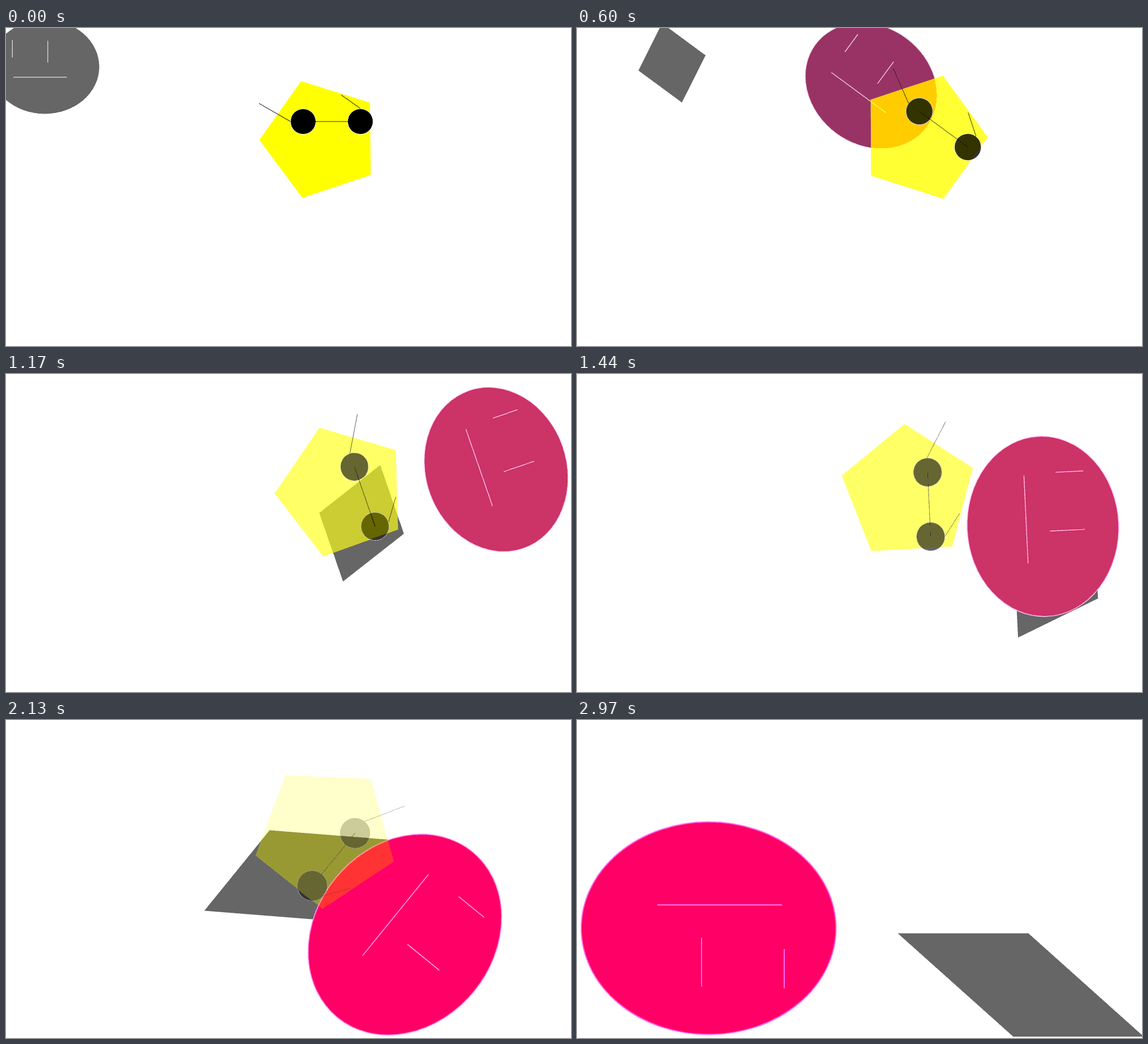
Animation of 998 by 561 pixels, one loop 3000 ms. Source, as an HTML page with a canvas:

```html
<!DOCTYPE html>
<html lang="en">
<head>
<meta charset="utf-8">
<title>Turning shapes</title>
<style>
  html, body { margin: 0; width: 998px; height: 561px; overflow: hidden; background: #fff; }
  canvas { display: block; filter: url(#web); }
  svg { position: absolute; width: 0; height: 0; }
</style>
</head>
<body>
<canvas id="stage" width="998" height="561"></canvas>
<svg aria-hidden="true">
  <!-- lifts the dark tones a little, then snaps every channel to six levels -->
  <filter id="web" x="0" y="0" width="1" height="1" color-interpolation-filters="sRGB">
    <feComponentTransfer>
      <feFuncR type="linear" slope=".98" intercept=".016"/>
      <feFuncG type="linear" slope=".98" intercept=".016"/>
      <feFuncB type="linear" slope=".98" intercept=".016"/>
    </feComponentTransfer>
    <feComponentTransfer>
      <feFuncR type="discrete" tableValues="0 .2 .2 .4 .4 .6 .6 .8 .8 1"/>
      <feFuncG type="discrete" tableValues="0 .2 .2 .4 .4 .6 .6 .8 .8 1"/>
      <feFuncB type="discrete" tableValues="0 .2 .2 .4 .4 .6 .6 .8 .8 1"/>
    </feComponentTransfer>
  </filter>
</svg>
<script>
const ctx = document.getElementById('stage').getContext('2d');
const STEP = 30, STEPS = 100, LAST = STEPS - 1, RAD = Math.PI / 180, TURN = 2 * Math.PI;

// Turning points of the two straight-legged paths: [step, x, y]
const discPath = [
  [0, 68.5, 68.5], [12, 339.5, 85.3], [36, 880, 135], [48, 823, 268.8],
  [60, 795, 365.8], [82, 614.1, 391.4], [99, 232.5, 367.3]
];
const slabPath = [
  [0, 68, 68], [7, 271, 232], [18, 119.3, 40.3], [50, 894.7, 380.1],
  [60, 815.6, 140], [82, 209.6, 407.4], [99, 784, 467.5]
];

const mix = (a, b, p) => a + (b - a) * p;
const clamp = v => Math.max(0, Math.min(255, v));
const rgb = (...c) => `rgb(${c.map(v => Math.round(clamp(v))).join()})`;
const polar = (r, a) => [r * Math.cos(a), r * Math.sin(a)];

function along(path, n) {
  const i = Math.max(1, path.findIndex(k => k[0] >= n));
  const [n0, x0, y0] = path[i - 1], [n1, x1, y1] = path[i];
  const p = (n - n0) / (n1 - n0);
  return [mix(x0, x1, p), mix(y0, y1, p)];
}

// One quick loop, then a slow drift along an arc
function pentaPlace(n) {
  const loop = 17;
  if (n >= loop) return [629.8 - 0.92 * n, 210.2 - 0.0163 * (n - 52.5) ** 2];
  const [x, y] = polar(1, TURN * (n / loop - 0.25));
  return [555.9 + 3.4 * n + 168.7 * x, 196.4 - 0.4 * n + 180 * (1 + y)];
}

function place([x, y], angle, sx, sy) {
  ctx.translate(x, y);
  ctx.rotate(angle);
  ctx.scale(sx, sy);
}

function polygon(points) {
  ctx.beginPath();
  points.forEach(([x, y]) => ctx.lineTo(x, y));
  ctx.closePath();
  ctx.fill();
}

// Strokes keep an even width whatever the scale of the shape
function stroke(width) {
  ctx.save();
  ctx.resetTransform();
  ctx.lineWidth = width;
  ctx.stroke();
  ctx.restore();
}

function line(x0, y0, x1, y1, width) {
  ctx.beginPath();
  ctx.moveTo(x0, y0);
  ctx.lineTo(x1, y1);
  stroke(width);
}

function drawSlab(n, p) {
  const [x, y] = along(slabPath, n);
  const [ux, uy] = polar(mix(30.6, 115.4, p), Math.PI * p);
  const [vx, vy] = polar(mix(23.7, 137, p), mix(90, 221.8, p) * RAD);
  ctx.fillStyle = '#666';
  polygon([
    [x - ux - vx, y - uy - vy], [x + ux - vx, y + uy - vy],
    [x + ux + vx, y + uy + vy], [x - ux + vx, y - uy + vy]
  ]);
}

function drawDisc(n, p) {
  const sx = mix(0.43, 1, p), sy = mix(0.445, 1, p);
  const width = Math.max(1, 2 * sx);
  const tint = base => rgb(base + 230 * p, base - 153 * p, base - 22 * p);
  ctx.save();
  place(along(discPath, n), Math.PI * p, sx, sy);
  ctx.fillStyle = tint(102);
  ctx.strokeStyle = tint(255);
  ctx.beginPath();
  ctx.ellipse(0, 0, 225, 187.5, 0, 0, TURN);
  ctx.fill();
  stroke(width);
  line(-129.5, 41, 90.5, 41, width);
  line(-133.5, -37, -133.5, -106, width);
  line(12.5, -17, 12.5, -103, width);
  ctx.restore();
}

function drawPenta(n, p) {
  const s = mix(1, 1.259, p);
  ctx.save();
  ctx.globalAlpha = 1 - p;
  place(pentaPlace(n), Math.PI * p, s, s);
  ctx.fillStyle = '#ff0';
  polygon([0, 1, 2, 3, 4].map(i => polar(108.4, (35.4 + 72 * i) * RAD)));
  ctx.fillStyle = '#000';
  ctx.strokeStyle = '#fff';
  for (const x of [-31, 70]) {
    ctx.beginPath();
    ctx.arc(x, -31.4, 22.5, 0, TURN);
    ctx.fill();
    stroke(1);
  }
  ctx.strokeStyle = '#000';
  line(-31, -31.4, 70, -31.4, 1);
  line(-108.9, -63.4, -53.4, -31.4, 1);
  line(36.1, -78.4, 70, -54.4, 1);
  ctx.restore();
}

function draw(n) {
  const p = n / LAST;
  ctx.fillStyle = '#fff';
  ctx.fillRect(0, 0, 998, 561);
  drawSlab(n, p);
  drawDisc(n, p);
  drawPenta(n, p);
}

const start = performance.now();
function tick() {
  draw(Math.floor((performance.now() - start) / STEP) % STEPS);
  requestAnimationFrame(tick);
}
tick();
</script>
</body>
</html>
```
